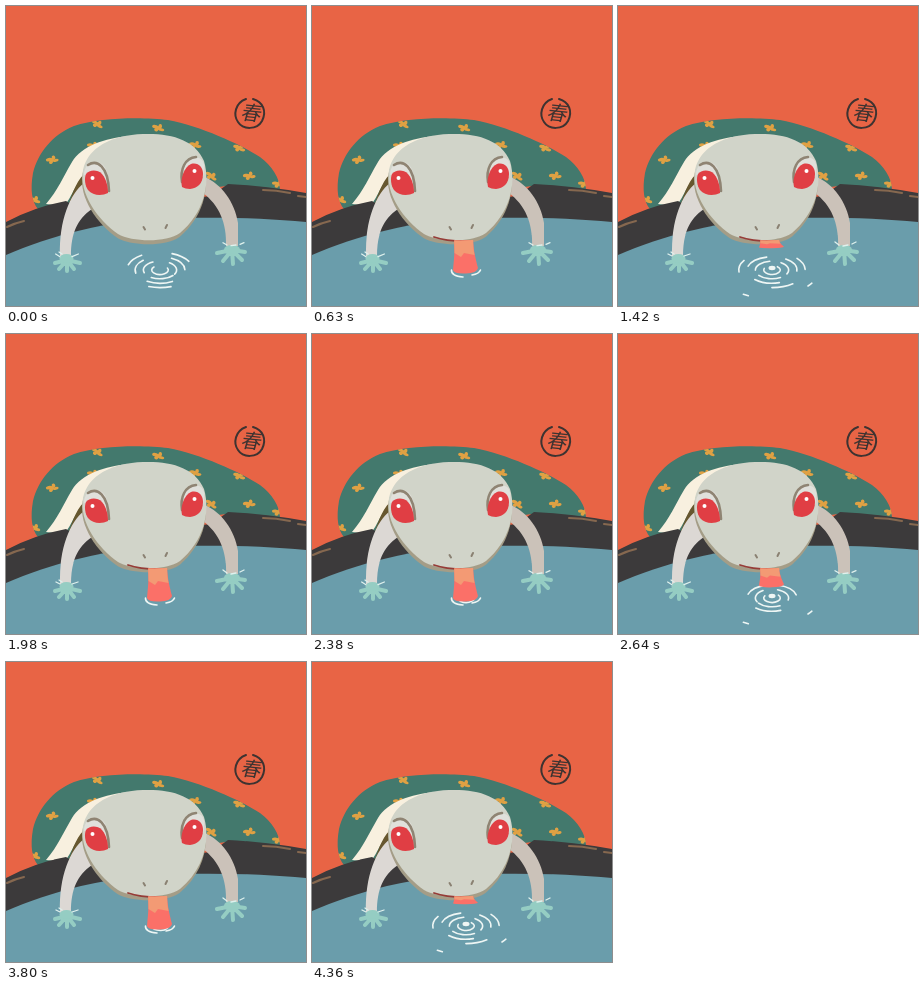
Recreate the animation shown at these times as an HTML page. Size 300 by 300 pixels, loop 4.46 s.

```html
<!DOCTYPE html>
<html lang="en">
<head>
<meta charset="utf-8">
<title>Frog drinking</title>
<style>
html, body { margin: 0; width: 100%; height: 100%; overflow: hidden; background: #e86445; }
svg { display: block; width: 100vw; height: 100vh; }
.line { fill: none; stroke-linecap: round; stroke-linejoin: round; }
.water { stroke: #eef6f4; stroke-width: 1.6; }
.seal { font: 500 20px "Noto Sans CJK SC", "Noto Sans CJK JP", "Noto Sans CJK", sans-serif; }
</style>
</head>
<body>
<svg viewBox="0 0 300 300">
  <defs>
    <g id="flower" fill="#e0a143">
      <ellipse cx="-3" cy="-1" rx="3" ry="1.7"/>
      <ellipse cx="2" cy="-2" rx="1.8" ry="2.2"/>
      <ellipse cx="-1.5" cy="2" rx="2" ry="1.7"/>
      <ellipse cx="3.5" cy="1.2" rx="3" ry="1.5"/>
      <circle r="2"/>
    </g>
    <path id="robe" d="M32 203C26 196 24 184 27 167C32 147 46 129 68 120C94 111 138 111 162 114C194 120 234 138 254 151C266 160 274 172 274 184L220 180L60 201Z"/>
    <path id="skull" d="M137 128C166 127 189 134 198 155C205 179 197 208 174 227C160 237 126 236 112 228C92 214 73 188 77 164C82 141 106 129 137 128Z"/>
    <clipPath id="robeClip"><use href="#robe"/></clipPath>
    <clipPath id="mouthClip"><path d="M115 230Q138 237 172 233V300H115Z"/></clipPath>
    <clipPath id="leftEye"><path id="leftShape" d="M80 168C83 164 91 163 96 168C101 174 102 182 102 187C96 190 87 190 82 184C79 180 78 172 80 168Z"/></clipPath>
    <clipPath id="rightEye"><path id="rightShape" d="M176 181C174 173 178 161 185 158C192 156 197 161 197 168C197 178 191 182 184 183C181 183 178 182 176 181Z"/></clipPath>
  </defs>

  <rect width="300" height="300" fill="#e86445"/>
  <path class="line" stroke="#3d3331" stroke-width="2" d="M240 93C229 97 227 109 232 116C237 124 251 124 256 115C261 105 257 96 247 93"/>
  <text class="seal" transform="translate(244 114) rotate(6) skewX(-10)" text-anchor="middle" fill="#3d3331">春</text>

  <use href="#robe" fill="#43796d"/>
  <g id="flowers" clip-path="url(#robeClip)"></g>
  <path fill="#f8f0df" d="M124 130C98 132 76 140 66 156C57 171 52 184 40 198L58 200C67 190 68 178 82 166Z"/>
  <path fill="#67572f" d="M82 165C71 172 67 186 62 200L74 192L82 178Z"/>

  <path fill="#3c3a3b" d="M0 216Q28 201 60 195L75 204L205 190L222 178Q262 180 300 187V218L200 216L0 252Z"/>
  <path fill="#6a9dab" d="M0 249C44 230 100 214 168 212C218 211 262 212 300 216V300H0Z"/>
  <path class="line" stroke="#86684f" stroke-width="2" d="M1 221Q9 217 18 215M257 184Q270 184 284 187M292 190L300 191"/>

  <path fill="#dcd8d4" d="M78 177C64 188 53 214 54 250H65C65 228 71 213 86 203Z"/>
  <path fill="#cbc2b9" d="M199 171C215 178 229 196 232 217V240H220C221 217 213 199 197 187Z"/>
  <g class="line" stroke="#95cdc3" stroke-width="4">
    <path d="M61 254L49 257M61 254L53 263M61 254L61 265M61 254L68 263M61 254L74 257"/>
    <path d="M226 244L211 247M226 244L217 255M226 244L227 258M226 244L236 254M226 244L239 246"/>
  </g>
  <ellipse cx="60.500" cy="252.500" rx="7" ry="4.500" fill="#95cdc3"/>
  <ellipse cx="226" cy="243.500" rx="8" ry="4.500" fill="#95cdc3"/>
  <path id="wrists" class="line" stroke="#dff1ed" stroke-width="1.3"/>

  <use href="#skull" fill="#a49d87" transform="translate(-.5 4)"/>
  <use href="#skull" fill="#d1d4c9"/>
  <path class="line" stroke="#8a8172" stroke-width="2" d="M137.500 221L139 223.500M161 219L159.500 222"/>

  <path fill="#e0e0db" d="M78 169C78 157 88 153 96 158C101 162 102 170 103 178L88 172Z"/>
  <path fill="#e0e0db" d="M177 165C179 152 190 148 196 154C200 159 198 166 197 171Z"/>
  <path class="line" stroke="#8f8473" stroke-width="2.600" d="M82 159C91 153 102 160 103 185M176 176C174 163 179 152 190 151"/>
  <use href="#leftShape" fill="#e03e44"/>
  <use href="#rightShape" fill="#e03e44"/>
  <g id="lids">
    <rect clip-path="url(#leftEye)" x="70" y="145" width="40" fill="#d1d4c9"/>
    <rect clip-path="url(#rightEye)" x="165" y="139" width="40" fill="#d1d4c9"/>
    <path id="lidLines" class="line" stroke="#8f8473" stroke-width="2.400"/>
  </g>
  <circle cx="86.500" cy="172" r="2" fill="#fff"/>
  <circle cx="188.500" cy="165" r="2" fill="#fff"/>

  <path id="ripples" class="line water"/>
  <ellipse id="drop" cx="154" cy="262" rx="3.500" ry="2.200" fill="#eef6f4"/>
  <path id="mouth" class="line" stroke="#963c37" stroke-width="1.800" d="M122 231Q136 236 160 235"/>
  <g clip-path="url(#mouthClip)">
    <g id="tongue">
      <path fill="#fb7068" d="M142 230H161C161 244 164 254 166 262Q165 267 154 267.500Q142 268 141 264C142 254 143 245 142 230Z"/>
      <path fill="#f39a74" d="M142 230H161Q161 242 162.500 249L152 247L149 251L142.500 247Z"/>
    </g>
  </g>
  <path id="splash" class="line water" d="M139.500 264Q139 270 151 271M160 269Q167 268 168.500 264"/>
</svg>
<script>
const LOOP = 4460, DRAWINGS = 60, LICK = 20;
const POOL = { x: 154, y: 264, flat: 0.53 };
const MOUTH_Y = 234, BLINK_AT = 42;

const el = id => document.getElementById(id);
const show = (id, on) => el(id).setAttribute("visibility", on ? "visible" : "hidden");
const clamp = v => Math.min(1, Math.max(0, v));

function random(seed) {
  const v = Math.sin(seed * 12.9898) * 43758.5453;
  return v - Math.floor(v);
}

el("flowers").innerHTML = [[91, 118], [46, 154], [152, 122], [87, 140], [189, 139],
  [233, 142], [243, 170], [272, 178], [28, 194], [205, 170]]
  .map(([x, y], i) => `<use href="#flower" transform="translate(${x} ${y}) rotate(${40 * random(i + 1) - 15})"/>`)
  .join("");

// Part of a flattened ring around the pool, centred on an angle in degrees
function arc(r, mid, span) {
  const at = deg => {
    const a = deg * Math.PI / 180;
    return `${POOL.x + r * Math.cos(a)} ${POOL.y + r * POOL.flat * Math.sin(a)}`;
  };
  return `M${at(mid - span / 2)}A${r} ${r * POOL.flat} 0 ${+(span > 180)} 1 ${at(mid + span / 2)}`;
}

// Rings spread outwards, break up, and leave two flecks
function ripplePath(age) {
  let d = "";
  const fading = age > 10;
  const rings = fading ? 0 : Math.min(4, Math.floor(1 + age * 0.4));
  for (let k = 0; k < rings; k++) {
    const count = k ? 3 : 1;
    const span = (k ? 105 - 22 * k : 250) * (age > 9 ? 0.6 : 1);
    for (let j = 0; j < count; j++) {
      const jitter = 40 * random(age * 17 + k * 5 + j) - 20;
      d += arc(8.3 * (k + 1), 90 + 120 * j + jitter, span);
    }
  }
  if (fading) d += arc(28, 165, 9) + arc(26, 42, 14);
  else if (age > 2 && age < 9) d += arc(47, 36, 8) + arc(54, 119, 6);
  return d;
}

function drawLids(amount) {
  show("lids", amount);
  const [left, right] = el("lids").querySelectorAll("rect");
  const drop = 18 + 26 * amount;
  left.setAttribute("height", drop);
  right.setAttribute("height", drop);
  const ly = 145 + drop, ry = 139 + drop;
  el("lidLines").setAttribute("d",
    `M80 ${ly - 1}Q90 ${ly - 3} 101 ${ly + 1}M177 ${ry + 2}Q187 ${ry - 3} 197 ${ry - 1}`);
}

function drawWrists(index) {
  const d = 0.7 + 0.7 * Math.sin(index * Math.PI / 2);
  el("wrists").setAttribute("d",
    `M${50 - d / 2} 248L54 ${250 + d}M66 ${250 + d}L${72 + d / 2} 248M53 246L56 248` +
    `M217 ${236 + d}L221 239M225 ${240 - d / 2}L230 239M234 ${238 + d / 2}L238 ${236 + d}`);
}

function draw(index) {
  const phase = index % LICK;
  // Quick dart out, a hold, then a slow return
  const reach = clamp(Math.min((phase - 3) / 4, (21.2 - phase) / 9));
  el("tongue").setAttribute("transform",
    `translate(0 ${MOUTH_Y}) scale(1 ${reach}) translate(0 ${-MOUTH_Y})`);
  show("tongue", reach);
  show("mouth", reach);
  show("splash", reach === 1);

  const age = (phase + 9) % LICK;
  el("ripples").setAttribute("d", age < 13 ? ripplePath(age) : "");
  show("drop", age > 2 && age < 9);
  drawWrists(index);
  drawLids(Math.max(0, 0.8 - 0.45 * Math.abs(index - BLINK_AT)));
}

let start = null, shown = -1;
function tick(now) {
  if (start === null) start = now;
  const time = Math.max(0, now - start) % LOOP;
  const index = Math.round(time * DRAWINGS / LOOP) % DRAWINGS;
  if (index !== shown) draw(shown = index);
  requestAnimationFrame(tick);
}
draw(0);
requestAnimationFrame(tick);
</script>
</body>
</html>
```
